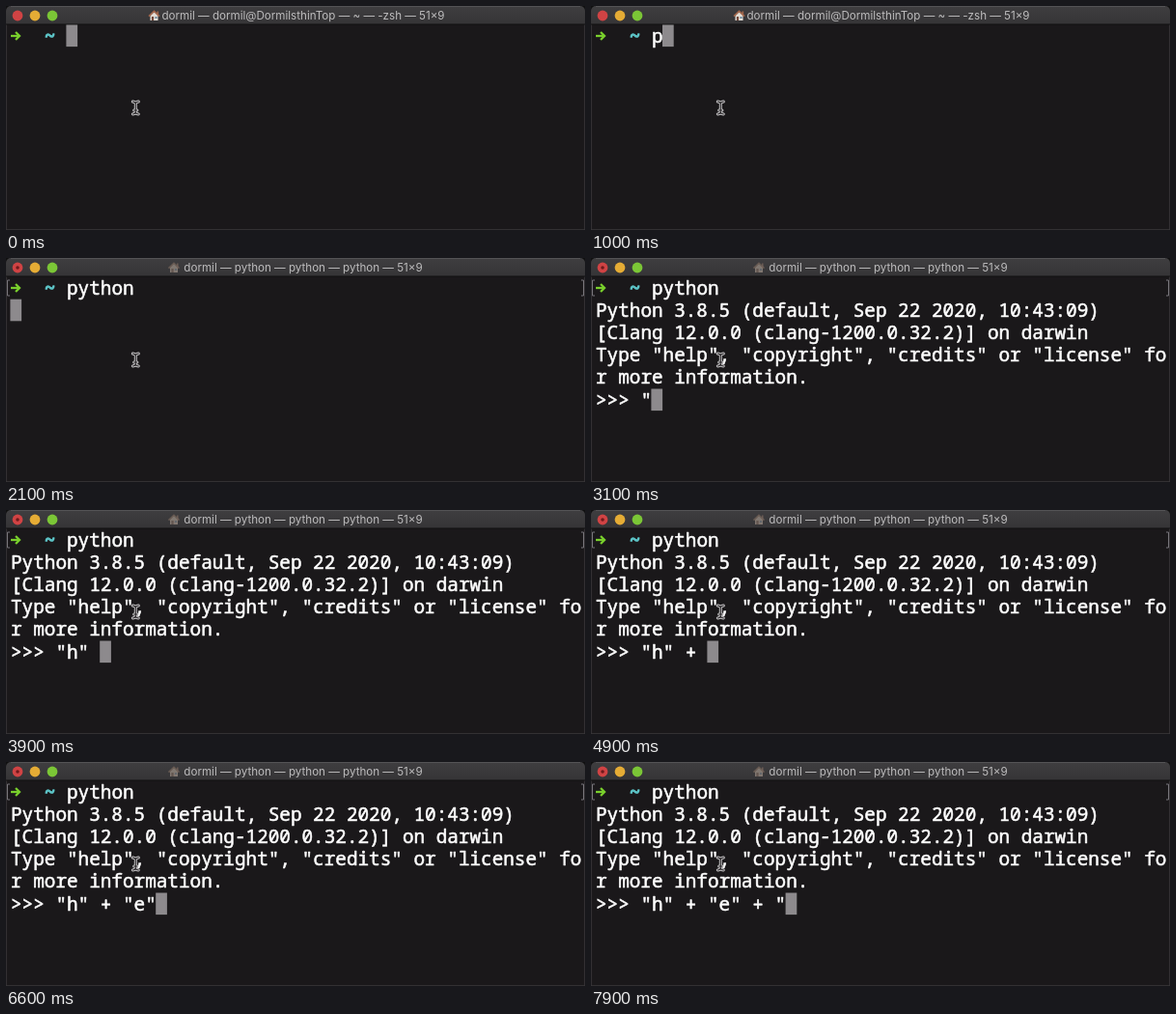
Recreate the animation shown at these times as an HTML page with a canvas. Size 600 by 232 pixels, loop 8 s.

```html
<!DOCTYPE html>
<html lang="en">
<head>
<meta charset="utf-8">
<title>Terminal session</title>
<style>
  html, body { margin: 0; width: 100%; height: 100%; overflow: hidden; background: #1a181a; }
  canvas { display: block; width: 600px; height: 232px; }
</style>
</head>
<body>
<canvas id="stage"></canvas>
<script>
const W = 600, H = 232, LOOP = 8000;
const LEFT = 5, TOP = 19.5, CELL = 11.6, ROW = 23.2, BASE = 18;
const MONO = '"Noto Sans Mono", "DejaVu Sans Mono", monospace';
const ENTER = 1900, OUTPUT = 2300;

const banner = [
  'Python 3.8.5 (default, Sep 22 2020, 10:43:09)',
  '[Clang 12.0.0 (clang-1200.0.32.2)] on darwin',
  'Type "help", "copyright", "credits" or "license" fo',
  'r more information.'
];

// Each typed line: its characters and the moment each one appears
const command = { text: 'python', times: [1000, 1200, 1300, 1400, 1500, 1700] };
const entry = {
  text: '"h" + "e" + "',
  times: [2900, 3300, 3700, 3900, 4300, 4600, 5000, 5300, 6200, 6800, 7100, 7400, 7700]
};
const typed = (line, t) => line.text.slice(0, line.times.filter(at => at <= t).length);

const canvas = document.getElementById('stage');
const scale = window.devicePixelRatio || 1;
canvas.width = W * scale;
canvas.height = H * scale;
const c = canvas.getContext('2d');

function rect(x, y, w, h, color) {
  c.fillStyle = color;
  c.fillRect(x, y, w, h);
}

function disc(x, y, r, color) {
  c.fillStyle = color;
  c.beginPath();
  c.arc(x, y, r, 0, Math.PI * 2);
  c.fill();
}

function poly(points, color) {
  c.fillStyle = color;
  c.beginPath();
  points.forEach(([x, y]) => c.lineTo(x, y));
  c.closePath();
  c.fill();
}

function line(points, width, color) {
  c.strokeStyle = color;
  c.lineWidth = width;
  c.beginPath();
  points.forEach(([x, y]) => c.lineTo(x, y));
  c.stroke();
}

// A thin stroke gives the medium weight the font lacks
function print(text, col, row, color = '#ffffff', extra = 0.55) {
  const x = LEFT + col * CELL, y = TOP + row * ROW + BASE;
  c.font = `400 19.33px ${MONO}`;
  c.textAlign = 'left';
  c.lineJoin = 'round';
  c.fillStyle = c.strokeStyle = color;
  c.lineWidth = extra;
  c.fillText(text, x, y);
  c.strokeText(text, x, y);
}

function block(col, row) {
  rect(LEFT + col * CELL - 0.6, TOP + row * ROW, 11.7, 22.6, '#8d8a8d');
}

function house(x, y, active) {
  c.globalAlpha = active ? 1 : 0.75;
  const wall = active ? '#e3ddd5' : '#988c83';
  const roof = active ? '#a3674c' : '#77655b';
  rect(x + 3, y - 4.5, 1.6, 4, roof);
  poly([[x - 4, y], [x, y - 4], [x + 4, y], [x + 4, y + 5], [x - 4, y + 5]], wall);
  line([[x - 5.5, y + 0.6], [x, y - 4.7], [x + 5.5, y + 0.6]], 1.6, roof);
  rect(x - 2.6, y + 1, 2.2, 4, active ? '#74483a' : '#594a44');
  rect(x + 1, y + 1, 2, 2, active ? '#6d8ba0' : '#59616a');
  c.globalAlpha = 1;
}

function titleBar(running) {
  const fill = c.createLinearGradient(0, 0, 0, 19);
  fill.addColorStop(0, '#3f3e40');
  fill.addColorStop(1, '#353436');
  rect(0, 0, W, 19, '#101010');
  c.fillStyle = fill;
  c.beginPath();
  c.roundRect(0, 0, W, 19, [5, 5, 0, 0]);
  c.fill();
  rect(5, 0, W - 10, 0.8, '#5b5a5c');
  rect(0, 18.5, W, 1, '#111011');

  disc(12, 10, 5.4, '#d04344');
  disc(30, 10, 5.4, '#e5ac35');
  disc(48, 10, 5.4, '#7bc636');
  if (running) disc(12, 10, 1.8, '#6f1a1c');

  c.font = '400 11.6px Inter, Roboto, sans-serif';
  c.textAlign = 'center';
  c.fillStyle = '#bdbcbd';
  c.fillText(running
    ? 'dormil — python — python — python — 51×9'
    : 'dormil — dormil@DormilsthinTop — ~ — -zsh — 51×9', 308, 14.2);
  house(running ? 174 : 153.5, 10, !running);
}

function prompt() {
  const green = '#79cf2c';
  line([[5, 31], [13.5, 31]], 2.3, green);
  line([[10, 27], [14, 31], [10, 35]], 2.3, green);
  print('~', 3, 0, '#5cc3c6', 1.3);
}

function brackets() {
  const color = '#77757a';
  line([[4, 23], [1.5, 23], [1.5, 39], [4, 39]], 1, color);
  line([[596, 23], [598.5, 23], [598.5, 39], [596, 39]], 1, color);
}

// I-beam pointer: light outline around a dark core
function pointer(x, y) {
  c.lineCap = 'round';
  for (const [width, color] of [[3, '#c9c7c9'], [1.1, '#252325']]) {
    line([[x - 3, y - 6.5], [x - 1, y - 6], [x, y - 5], [x + 1, y - 6], [x + 3, y - 6.5]], width, color);
    line([[x - 3, y + 6.5], [x - 1, y + 6], [x, y + 5], [x + 1, y + 6], [x + 3, y + 6.5]], width, color);
    line([[x, y - 5], [x, y + 5]], width, color);
    line([[x - 1.6, y + 2.5], [x + 1.6, y + 2.5]], width, color);
  }
  c.lineCap = 'butt';
}

function draw(t) {
  const running = t >= ENTER;
  c.setTransform(scale, 0, 0, scale, 0, 0);
  c.lineJoin = 'miter';
  rect(0, 0, W, H, '#1a181a');
  rect(0, 19, 0.8, H - 19, '#3a383a');
  rect(W - 0.8, 19, 0.8, H - 19, '#3a383a');
  rect(0, H - 0.8, W, 0.8, '#3a383a');
  titleBar(running);
  prompt();

  const name = typed(command, t);
  print(name, 5, 0);
  if (!running) {
    block(5 + name.length, 0);
  } else {
    brackets();
    if (t < OUTPUT) {
      block(0, 1);
    } else {
      banner.forEach((text, i) => print(text, 0, i + 1));
      const input = '>>> ' + typed(entry, t);
      print(input, 0, 5);
      block(input.length, 5);
    }
  }
  pointer(134.3, 105.5);
}

const start = performance.now();
function tick() {
  draw((performance.now() - start) % LOOP);
  requestAnimationFrame(tick);
}
tick();
</script>
</body>
</html>
```
